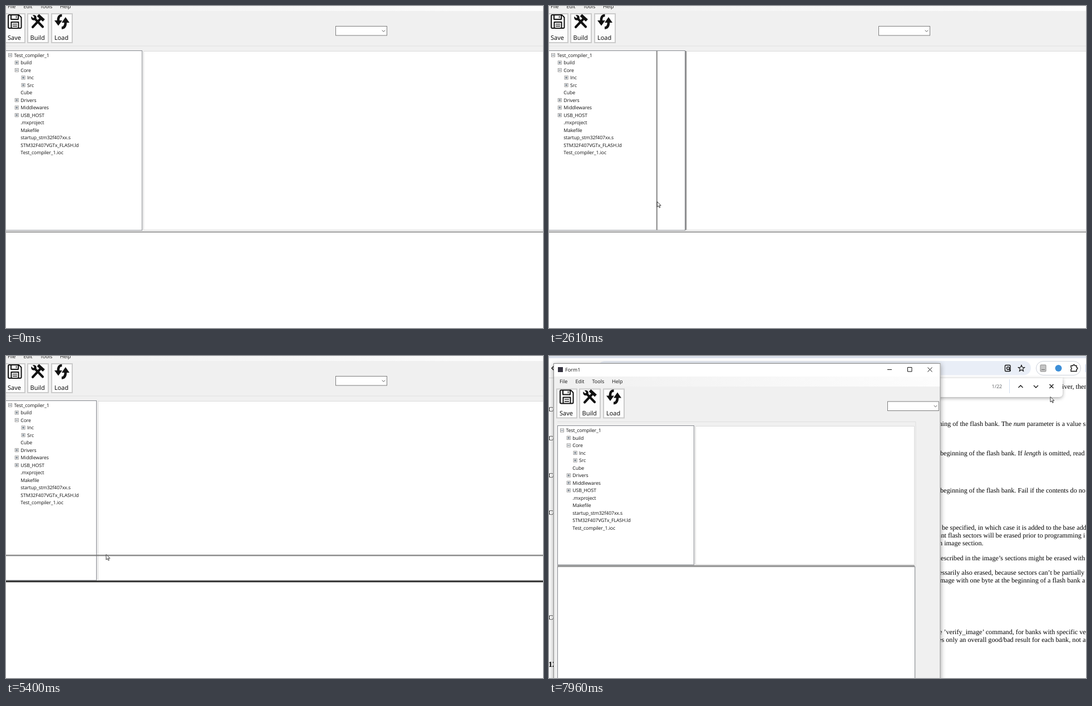
Write an HTML page that moves like this. It is 965x580 px and loops after 8 s.

```html
<!DOCTYPE html>
<html lang="en">
<head>
<meta charset="utf-8">
<title>Form1</title>
<style>
html, body { margin: 0; width: 100%; height: 100%; overflow: hidden; background: #fff; }
svg { display: block; width: 100%; height: 100%; }
text { font: 9px "Open Sans", "Noto Sans", sans-serif; fill: #111; text-rendering: geometricPrecision; white-space: pre; }
.tree text { font-size: 8.7px; letter-spacing: -.1px; }
.btn rect { fill: #fdfdfd; stroke: #cbcbcb; stroke-width: 2; }
.btn text { font-size: 11px; fill: #000; }
.page text { font: 12.2px "Liberation Serif", "Noto Serif", serif; fill: #000; }
.ink { fill: none; stroke: #111; }
.box { fill: #fff; stroke: #85888e; }
.pane { fill: #fff; stroke: #dcdcdc; }

.anim, .scene { animation: 8s step-end -12ms infinite; }
.main { animation-name: main; }
.restore { animation-name: restore; }
.desk { animation-name: desk; }
@keyframes main { 0% { opacity: 1 } 97.75%, 100% { opacity: 0 } }
@keyframes restore { 0% { opacity: 0 } 97.75% { opacity: 1 } 98.75%, 100% { opacity: 0 } }
@keyframes desk { 0% { opacity: 0 } 98.75%, 100% { opacity: 1 } }

/* layout after each splitter release */
.files { animation-name: files; }
.editor { animation-name: editor; }
.output { animation-name: output; }
@keyframes files {
  0% { width: 245.5px; height: 323.5px }
  36.875% { width: 163.5px; height: 323.5px }
  70.875%, 100% { width: 163.5px; height: 273px }
}
@keyframes editor {
  0% { x: 247.5px; height: 322px }
  36.875% { x: 165.5px; height: 322px }
  70.875%, 100% { x: 165.5px; height: 271.5px }
}
@keyframes output { 0% { transform: none } 70.875%, 100% { transform: translateY(-50px) } }

/* splitter highlights and drag ghosts */
.vbar { animation-name: vbar; }
.hbar { animation-name: hbar; }
.vghost { animation-name: vghost-on, vghost; }
.hghost { animation-name: hghost-on, hghost; }
@keyframes vbar { 0% { opacity: 0 } 25.625% { opacity: 1 } 36.875%, 100% { opacity: 0 } }
@keyframes hbar { 0% { opacity: 0 } 62.375% { opacity: 1 } 70.875%, 100% { opacity: 0 } }
@keyframes vghost-on { 0% { opacity: 0 } 27.375% { opacity: 1 } 62.375%, 100% { opacity: 0 } }
@keyframes hghost-on { 0% { opacity: 0 } 62.375%, 100% { opacity: 1 } }
@keyframes vghost {
  0% { transform: translateX(245px) }
  27.375% { transform: translateX(245px); animation-timing-function: steps(11, start) }
  36.875%, 100% { transform: translateX(163px) }
}
@keyframes hghost {
  0% { transform: translateY(405px) }
  62.375% { transform: translateY(405px); animation-timing-function: steps(6, start) }
  67.5% { transform: translateY(357.5px) }
  68.375% { transform: translateY(357.5px); animation-timing-function: steps(2, start) }
  70%, 100% { transform: translateY(354.6px) }
}

/* pointers */
.arrow { animation-name: arrow-on, arrow; }
.ew { animation-name: ew-on, ew; }
.ns { animation-name: ns-on, ns; }
@keyframes arrow-on {
  0% { opacity: 0 } 2.375% { opacity: 1 } 19.875% { opacity: 0 } 27.375% { opacity: 1 }
  36.875% { opacity: 0 } 45.5% { opacity: 1 } 57.375% { opacity: 0 } 63.25% { opacity: 1 }
  70.875% { opacity: 0 } 75% { opacity: 1 } 82.625%, 100% { opacity: 0 }
}
@keyframes arrow {
  0% { transform: translate(720px, 455px) }
  2.375% { transform: translate(720px, 455px); animation-timing-function: steps(2) }
  4% { transform: translate(472px, 324px) }
  6.5% { transform: translate(472px, 324px); animation-timing-function: steps(5, start) }
  10.5% { transform: translate(345px, 399px); animation-timing-function: steps(4, start) }
  13.75% { transform: translate(215px, 372px); animation-timing-function: steps(4, start) }
  16.5% { transform: translate(243px, 351px) }
  17.375% { transform: translate(245px, 351px) }
  27.375% { transform: translate(246px, 352px); animation-timing-function: steps(11, start) }
  36.875% { transform: translate(164px, 352px) }
  45.5% { transform: translate(166px, 392px); animation-timing-function: steps(5, start) }
  49.75% { transform: translate(176px, 402px) }
  50.625% { transform: translate(177px, 403px) }
  51.5% { transform: translate(177px, 404px) }
  54% { transform: translate(178px, 404px) }
  62.375% { transform: translate(179.5px, 404px); animation-timing-function: steps(6, start) }
  67.5% { transform: translate(179.5px, 357px) }
  68.375% { transform: translate(179.5px, 357px); animation-timing-function: steps(2, start) }
  70% { transform: translate(179.5px, 354px) }
  75% { transform: translate(179.5px, 354px); animation-timing-function: steps(4, start) }
  77.625% { transform: translate(449px, 332px) }
  80.875% { transform: translate(620px, 222px) }
  81.75%, 100% { transform: translate(780px, 120px) }
}
@keyframes ew-on {
  0% { opacity: 0 } 19.875% { opacity: 1 } 27.375% { opacity: 0 }
  36.875% { opacity: 1 } 45.5%, 100% { opacity: 0 }
}
@keyframes ew {
  0% { transform: translate(246px, 352px) }
  30% { transform: translate(164px, 352px) }
  40.125% { transform: translate(164px, 352px); animation-timing-function: steps(2, start) }
  41.75% { transform: translate(164px, 370px) }
  42.75% { transform: translate(164px, 370px); animation-timing-function: steps(3, start) }
  45.5%, 100% { transform: translate(164px, 396px) }
}
@keyframes ns-on {
  0% { opacity: 0 } 57.375% { opacity: 1 } 63.25% { opacity: 0 }
  70.875% { opacity: 1 } 75%, 100% { opacity: 0 }
}
@keyframes ns {
  0% { transform: translate(179px, 405px) }
  67%, 100% { transform: translate(179px, 354px) }
}
</style>
</head>
<body>
<svg viewBox="0 0 965 580">
<defs>
  <linearGradient id="strip"><stop stop-color="#f0f0f0"/><stop offset="1" stop-color="#fdfdfd"/></linearGradient>

  <g id="bar">
    <text x="3" y="3.7">File</text><text x="31.5" y="3.7">Edit</text>
    <text x="61.5" y="3.7">Tools</text><text x="97" y="3.7">Help</text>
    <g class="btn">
      <rect x="-2" y="14" width="36" height="52"/>
      <rect x="39" y="14" width="37" height="52"/>
      <rect x="82" y="14" width="37" height="52"/>
      <text x="3" y="61.4">Save</text><text x="43.5" y="61.4">Build</text><text x="87" y="61.4">Load</text>
    </g>
    <path class="ink" stroke-width="2" stroke-linejoin="round" d="M6 16H23L27.5 20.5V38a2 2 0 0 1-2 2H6a2 2 0 0 1-2-2V18a2 2 0 0 1 2-2zM9 16v8h13v-8M9.5 40V29h13v11"/>
    <path class="ink" stroke-width="1.4" d="M12 32.6h8M12 36.2h8M18.5 18v3.5"/>
    <path class="ink" stroke-width="4.2" stroke-linecap="round" d="M48 38L61 24M53 24L66 37.5"/>
    <path class="ink" stroke-width="5.5" d="M57.5 16.5L68 26"/>
    <circle cx="50" cy="21" r="4.8" fill="#111"/>
    <path d="M45 16L50 21" stroke="#fdfdfd" stroke-width="3"/>
    <path class="ink" stroke-width="4.6" d="M100.5 17C95.5 17 93.8 20 93.8 27M100 39.5C105 39.5 107 36 107 29"/>
    <path d="M87 26H101L94 35.5zM100 30H114L107 20z" fill="#111"/>
    <rect x="592.5" y="36.5" width="92" height="16.5" fill="#fff" stroke="#7c7c7c"/>
    <path class="ink" style="stroke:#555" d="M675.7 43.5L678.5 46.3L681.3 43.5"/>
  </g>

  <g id="tree" class="tree"></g>
  <path id="ptr" d="M.5 .5V10L2.8 7.9L4.4 11.4L5.9 10.7L4.3 7.3H7.3z" fill="#fff" stroke="#222" stroke-width=".9"/>
  <g id="split">
    <path d="M-6 0L-3-2.5V-1H3V-2.5L6 0L3 2.5V1H-3V2.5zM-1-5.5V5.5M1-5.5V5.5" fill="#fff" stroke="#fff" stroke-width="2.4"/>
    <path d="M-6 0L-3-2.6V2.6zM6 0L3-2.6V2.6z"/>
    <path class="ink" style="stroke:#000" d="M-4 0H4M0-4.8V4.8" stroke-width="1.3"/>
  </g>
</defs>

<g class="scene main">
  <rect width="965" height="580" fill="#f0f0f0"/>
  <rect width="965" height="9" fill="url(#strip)"/>
  <path d="M0 72H965" stroke="#e0e0e0"/>
  <use href="#bar"/>
  <rect class="box anim files" x="-1" y="80.5" width="245.5" height="323.5"/>
  <rect class="pane anim editor" x="247.5" y="81.5" width="830" height="322"/>
  <use href="#tree"/>
  <g class="anim output">
    <rect y="407" width="965" height="240" fill="#fff"/>
    <rect y="406.5" width="965" height="1.3" fill="#6e6e6e"/>
  </g>
  <rect class="anim vbar" x="245" y="81" width="2" height="322.5" fill="#949494"/>
  <rect class="anim vghost" y="81" width="2" height="322.5" fill="#868686"/>
  <rect class="anim hbar" y="404.6" width="965" height="2.2" fill="#1c1c1c"/>
  <rect class="anim hghost" width="965" height="2.4" fill="#747474"/>
  <use class="anim arrow" href="#ptr"/>
  <use class="anim ew" href="#split"/>
  <g class="anim ns"><use href="#split" transform="rotate(90)"/></g>
</g>

<g class="scene restore">
  <rect width="965" height="580" fill="#fff"/>
  <text x="-1" y="11.3">Form1</text>
  <rect y="19" width="691" height="20" fill="url(#strip)"/>
  <rect y="39" width="965" height="58" fill="#f0f0f0"/>
  <rect y="97" width="691" height="299" fill="#f0f0f0"/>
  <path d="M0 103.5H691" stroke="#e0e0e0"/>
  <use href="#bar" transform="matrix(1.03 0 0 1.03 -15.6 28.6)"/>
  <rect class="box" x="-2" y="111.5" width="142.5" height="275"/>
  <path d="M691 112.5H155.5V387H691" class="pane"/>
  <path d="M696.5 19.5H965V38.5H696.5zM696.5 97H965V387H696.5zM696.5 396H965V580H696.5z"/>
  <rect x="696.5" y="387" width="269" height="8" fill="#f0f0f0"/>
  <path d="M0 390.2H965" stroke="#8a8a8a" stroke-width="1.3"/>
  <rect y="392.7" width="691" height="2" fill="#868686"/>
  <path d="M0 395.6H965" stroke="#6e6e6e"/>
  <rect y="396" width="696.5" height="184" fill="#fff"/>
  <path d="M691 347.2H696.5M691 349.2H696.5" stroke="#666"/>
</g>

<g class="scene desk">
  <rect width="965" height="580" fill="#fff"/>
  <rect width="965" height="4" fill="#dbe1eb"/>
  <rect x="88" y="9" width="778" height="25.5" rx="12.7" fill="#e9eef7"/>
  <path d="M0 39.5H965" stroke="#dedede"/>
  <path d="M9 18L5 22L9 26" class="ink" stroke-width="1.5"/>
  <g class="ink" stroke-width="1.4">
    <rect x="819.5" y="16.5" width="9.5" height="11" rx="1.5"/>
    <circle cx="825" cy="22" r="2.4"/><path d="M826.8 24L829.5 27"/>
    <path stroke-width="1.2" d="M849 16.5L850.6 20.3L854.6 20.6L851.5 23.2L852.5 27.2L849 25L845.5 27.2L846.5 23.2L843.4 20.6L847.4 20.3z"/>
    <rect x="875.5" y="9.5" width="80" height="25" rx="12.5" stroke="#ccd1da" stroke-width="1"/>
    <path d="M938 17.5H941.5a1.8 1.8 0 0 1 3.6 0H948V20.5a1.8 1.8 0 0 1 0 3.6V27.5H938V24a1.8 1.8 0 0 0 0-3.4z"/>
  </g>
  <rect x="883" y="16" width="10" height="12" rx="1" fill="#c4c4c4" stroke="#8b8b8b"/>
  <path d="M885 24.5H891" stroke="#666"/>
  <circle cx="915.5" cy="22" r="6" fill="#3d8fd8"/>
  <path d="M964.5 15V29" stroke="#c5d5f0"/>

  <g class="page">
    <text x="918" y="58.5">river, then</text>
    <text x="700.5" y="125.5">ning of the flash bank. The <tspan font-style="italic">num</tspan> parameter is a value s</text>
    <text x="703" y="178.5">beginning of the flash bank. If <tspan font-style="italic">length</tspan> is omitted, read</text>
    <text x="703" y="245.5">beginning of the flash bank. Fail if the contents do no</text>
    <text x="706" y="312.5">be specified, in which case it is added to the base add</text>
    <text x="699" y="326.5">ant flash sectors will be erased prior to programming i</text>
    <text x="701" y="340.5">h image section.</text>
    <text x="698" y="367.5">described in the image’s sections might be erased with</text>
    <text x="701" y="393.5">essarily also erased, because sectors can’t be partially</text>
    <text x="699" y="407.5">image with one byte at the beginning of a flash bank a</text>
    <text x="701" y="501">e ’verify_image’ command, for banks with specific ve</text>
    <text x="700" y="515">es only an overall good/bad result for each bank, not a</text>
    <text x="-1" y="99.5">Co</text><text x="-1" y="152">Co</text><text x="-1" y="219">Co</text>
    <text x="-1" y="286">Co</text><text x="-1" y="474.5">Co</text>
    <text x="-1" y="560" style="font-size:14px;font-weight:bold">12</text>
  </g>

  <path d="M690 39.5H923V68a6 6 0 0 1-6 6H690z" fill="#fff" style="filter:drop-shadow(0 2px 3px #0005)"/>
  <text x="795.5" y="57.8" style="fill:#5c5f63">1/22</text>
  <path d="M827.5 42V67" stroke="#d4e0f2"/>
  <path class="ink" stroke-width="1.3" d="M843.5 57L847.5 53L851.5 57M871 53L875 57L879 53M899.5 51L906.5 58M906.5 51L899.5 58"/>
  <use href="#ptr" x="900.5" y="73"/>

  <rect x="8" y="13" width="695.5" height="580" fill="#f0f0f0" style="filter:drop-shadow(0 2px 5px #0006)"/>
  <rect x="8" y="13" width="695.5" height="24" fill="#fff"/>
  <rect x="9" y="37" width="694" height="18" fill="url(#strip)"/>
  <rect x="8.5" y="13.5" width="694.5" height="580" fill="none" stroke="#8c8c8c"/>
  <rect x="16" y="20" width="9" height="9" fill="#35323f"/>
  <text x="29" y="28">Form1</text>
  <path class="ink" d="M608 24.5H616M644.5 20.5H652V28H644.5zM680.5 20.5L688.5 28.5M688.5 20.5L680.5 28.5"/>
  <use href="#bar" transform="translate(16 45.5)"/>
  <path d="M15 118.5H659V580" fill="none" stroke="#dfdfdf"/>
  <rect class="box" x="15.5" y="125.5" width="245" height="250.5"/>
  <rect class="pane" x="263.5" y="126.5" width="393" height="249"/>
  <use href="#tree" transform="translate(16 45.5)"/>
  <rect class="box" x="15.5" y="379.5" width="642" height="230"/>
  <path d="M15 377.6H657M15 379.5H657" stroke="#6c6c6c" stroke-width="1.2"/>
</g>
</svg>
<script>
// [depth, expander, label]
const rows = [
  [0, '-', 'Test_compiler_1'], [1, '+', 'build'], [1, '-', 'Core'], [2, '+', 'Inc'], [2, '+', 'Src'],
  [1, '', 'Cube'], [1, '+', 'Drivers'], [1, '+', 'Middlewares'], [1, '+', 'USB_HOST'], [1, '', '.mxproject'],
  [1, '', 'Makefile'], [1, '', 'startup_stm32f407xx.s'], [1, '', 'STM32F407VGTx_FLASH.ld'], [1, '', 'Test_compiler_1.ioc']
];
const expander = (x, y, sign) =>
  `<rect x="${x - 3}" y="${y - 3}" width="6" height="6" fill="#fff" stroke="#999"/>` +
  `<path d="M${x - 2} ${y}h4${sign === '+' ? `M${x} ${y - 2}v4` : ''}" stroke="#345" stroke-width=".9"/>`;

document.getElementById('tree').innerHTML = rows.map(([depth, sign, label], i) => {
  const y = 88.5 + i * 13.5, x = 7.5 + depth * 11.8;
  return (sign && expander(x, y, sign)) + `<text x="${x + 7}" y="${y + 3}">${label}</text>`;
}).join('');
</script>
</body>
</html>
```
